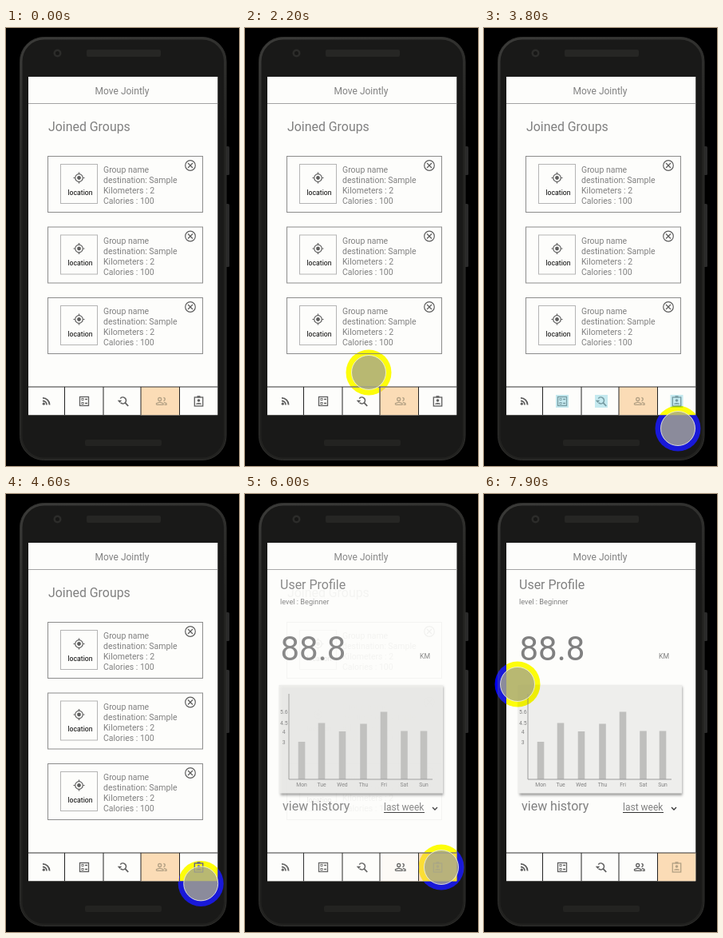
An HTML page with a canvas for the animation above (8 s loop, 292 px wide and 548 px high).

```html
<!DOCTYPE html>
<html lang="en">
<head>
<meta charset="utf-8">
<title>Running app prototype</title>
<style>
html, body { margin: 0; width: 100%; height: 100%; overflow: hidden; background: #000; }
canvas { display: block; width: 292px; height: 548px; }
</style>
</head>
<body>
<canvas id="stage"></canvas>
<script>
const W = 292, H = 548, LOOP = 8000, STEP = 100;
const canvas = document.getElementById('stage');
const ctx = canvas.getContext('2d');
const dpr = window.devicePixelRatio || 1;
canvas.width = W * dpr;
canvas.height = H * dpr;

const INK = '#808080', ICON = '#5e5e5e', PAPER = '#fdfdfb', TAB = '#fbdcb6';
const SCREEN = [28, 61, 237.5, 423.5];
const TAB_EDGES = [28, 73.5, 122, 169, 217.5, 265.5];
const TAB_ICONS = [rssIcon, listIcon, searchIcon, peopleIcon, badgeIcon];
const TAB_CENTERS = [50.5, 98, 147, 195, 241.5];
const TAB_Y = 467;

const MISSED_TAPS = [1300, 3300], TAB_TAP = 5400;

// pointer path: time, x, y
const PATH = [
  [600, 195, 467], [1000, 155, 431], [2400, 155, 431], [2800, 212, 458],
  [3100, 261, 488], [3300, 243, 498], [3400, 243, 501], [4400, 243, 501],
  [4900, 246, 467], [7100, 246, 467], [7200, 210, 481], [7700, 32, 254], [7900, 42, 238]
];

const clamp = v => Math.max(0, Math.min(1, v));
const span = (t, a, b) => clamp((t - a) / (b - a));
const ease = k => k * k * (3 - 2 * k);
const mix = (a, b, k) => a + (b - a) * k;

function text(str, x, y, size, color = INK, align = 'left') {
  ctx.font = `${size}px Roboto, Arial, sans-serif`;
  ctx.textAlign = align;
  ctx.fillStyle = color;
  ctx.fillText(str, x, y);
}

function box(x, y, w, h, color) {
  ctx.fillStyle = color;
  ctx.fillRect(x, y, w, h);
}

function frame(x, y, w, h, color, width = 1) {
  ctx.strokeStyle = color;
  ctx.lineWidth = width;
  ctx.strokeRect(x, y, w, h);
}

function round(x, y, w, h, r, fill, stroke) {
  ctx.beginPath();
  ctx.roundRect(x, y, w, h, r);
  ctx.fillStyle = fill;
  ctx.fill();
  if (!stroke) return;
  ctx.strokeStyle = stroke;
  ctx.lineWidth = 1;
  ctx.stroke();
}

function line(points, color, width = 1) {
  ctx.beginPath();
  points.forEach(([x, y]) => ctx.lineTo(x, y));
  ctx.strokeStyle = color;
  ctx.lineWidth = width;
  ctx.stroke();
}

function arc(x, y, r, color, width, from = 0, to = 2 * Math.PI) {
  ctx.beginPath();
  ctx.arc(x, y, r, from, to);
  ctx.strokeStyle = color;
  ctx.lineWidth = width;
  ctx.stroke();
}

function disc(x, y, r, color) {
  ctx.beginPath();
  ctx.arc(x, y, r, 0, 2 * Math.PI);
  ctx.fillStyle = color;
  ctx.fill();
}

function rssIcon(x, y, color) {
  disc(x - 3.2, y + 3.2, 1.6, color);
  for (const r of [5, 8.6]) arc(x - 4.5, y + 4.5, r, color, 1.8, -Math.PI / 2, 0);
}

function listIcon(x, y, color) {
  frame(x - 5.5, y - 5.5, 11, 11, color, 1.3);
  for (const dy of [-2.5, 2.5]) {
    frame(x - 3, y + dy - 1, 2, 2, color, 1);
    line([[x + 1, y + dy], [x + 4, y + dy]], color, 1.3);
  }
}

function searchIcon(x, y, color) {
  arc(x - 0.5, y - 1, 4, color, 1.5, -2.5, 2.4);
  line([[x + 2.3, y + 1.8], [x + 6.2, y + 6]], color, 1.8);
  ctx.beginPath();
  ctx.moveTo(x - 7.2, y - 1.2);
  ctx.lineTo(x - 1.8, y - 1.2);
  ctx.lineTo(x - 4.5, y + 2);
  ctx.fillStyle = color;
  ctx.fill();
}

function peopleIcon(x, y, color) {
  arc(x - 2.3, y - 2.5, 2, color, 1.3);
  arc(x + 2, y - 2.5, 2.2, color, 1.4, -1.4, 1.4);
  line([[x - 6.5, y + 4.3], [x - 6.5, y + 2.6], [x - 2.3, y + 1.2], [x + 2, y + 2.6],
    [x + 2, y + 4.3], [x - 6.5, y + 4.3]], color, 1.3);
  line([[x + 3, y + 1.3], [x + 6, y + 2.6], [x + 6, y + 4.3], [x + 3.5, y + 4.3]], color, 1.3);
}

function badgeIcon(x, y, color) {
  frame(x - 5.2, y - 5, 10.4, 11, color, 1.3);
  box(x - 2, y - 6.8, 4, 2.2, color);
  disc(x, y - 1, 1.8, color);
  ctx.beginPath();
  ctx.ellipse(x, y + 3.7, 3.5, 1.7, 0, Math.PI, 0);
  ctx.fill();
}

function targetIcon(x, y) {
  arc(x, y, 4.8, ICON, 1.2);
  disc(x, y, 2.4, ICON);
  for (const s of [-1, 1]) {
    line([[x + s * 5, y], [x + s * 7, y]], ICON, 1.2);
    line([[x, y + s * 5], [x, y + s * 7]], ICON, 1.2);
  }
}

function closeIcon(x, y) {
  arc(x, y, 6.3, ICON, 1.2);
  line([[x - 3, y - 3], [x + 3, y + 3]], ICON, 1.2);
  line([[x - 3, y + 3], [x + 3, y - 3]], ICON, 1.2);
}

function phone() {
  box(0, 0, W, H, '#000');
  round(275, 148, 5, 36, 1.5, '#2a2a2a');
  round(275, 220, 5, 79, 1.5, '#2a2a2a');
  const rim = ctx.createLinearGradient(17, 11, 80, 200);
  rim.addColorStop(0, '#3c3c3a');
  rim.addColorStop(1, '#222220');
  round(17.5, 11.5, 258.5, 529, 30, rim, '#2e2e2c');
  round(20.5, 14.5, 252.5, 523, 27, '#191918');
  disc(64.5, 31.5, 5, '#2c2c2a');
  disc(64.5, 31.5, 2.5, '#171716');
  round(101, 27, 93, 9, 2, '#262624');
  round(99, 515, 96, 8, 2, '#232321');
}

function base() {
  box(...SCREEN, PAPER);
  line([[28, 94.5], [265.5, 94.5]], '#a3a3a3');
  text('Move Jointly', 145.5, 82.5, 12, INK, 'center');
}

function navBar(active) {
  const left = TAB_EDGES[active];
  box(left, 449, TAB_EDGES[active + 1] - left, 35.5, TAB);
  line([[28, 449], [265.5, 449]], '#333');
  TAB_EDGES.slice(1, 5).forEach(x => line([[x, 449], [x, 484.5]], '#222'));
  TAB_ICONS.forEach((icon, i) =>
    icon(TAB_CENTERS[i], TAB_Y, i === active ? '#b3a184' : ICON));
}

function groupCard(y) {
  frame(52.5, y + 0.5, 194, 70, '#8c8c8c');
  frame(68.5, y + 10.5, 46, 49, '#b4b4b4');
  targetIcon(91.5, y + 27.5);
  text('location', 93, y + 48.5, 8.7, '#000', 'center');
  const rows = ['Group name', 'destination: Sample', 'Kilometers : 2', 'Calories : 100'];
  rows.forEach((row, i) => text(row, 122, y + 21 + i * 13.1, 10.5));
  closeIcon(231, y + 12);
}

function groupsScreen() {
  base();
  text('Joined Groups', 53, 129, 15.9);
  [160, 248.5, 337].forEach(groupCard);
  navBar(3);
}

function chart() {
  ctx.save();
  ctx.shadowColor = 'rgba(0,0,0,.4)';
  ctx.shadowBlur = 3 * dpr;
  ctx.shadowOffsetX = dpr;
  ctx.shadowOffsetY = 2 * dpr;
  box(42.5, 239, 205.5, 135.5, '#eeeeec');
  ctx.restore();
  const bars = [['Mon', 71, 310], ['Tue', 96, 286.5], ['Wed', 122, 297], ['Thu', 148.5, 287.5],
    ['Fri', 174, 272.5], ['Sat', 199.5, 296.5], ['Sun', 224, 296.5]];
  for (const [day, x, top] of bars) {
    box(x - 4.3, top, 8.6, 357 - top, '#bfbfbd');
    text(day, x, 365.5, 6.8, INK, 'center');
  }
  line([[55, 250], [55, 357], [235, 357]], '#9a9a9a');
  [['5.6', 275], ['4.5', 289], ['4', 299.5], ['3', 312.5]]
    .forEach(([label, y]) => text(label, label.length > 1 ? 53.5 : 50.5, y, 6.8, INK, 'right'));
}

function profileScreen() {
  base();
  text('User Profile', 44, 118.5, 16);
  text('level : Beginner', 44, 137.5, 9.2);
  text('88.8', 44.5, 207.5, 42);
  text('KM', 219, 206, 8.7);
  chart();
  text('view history', 47, 396, 16);
  text('last week', 174, 396, 12);
  line([[174, 398.5], [225, 398.5]], '#333');
  line([[235, 392], [238, 395], [241, 392]], '#333', 1.3);
  navBar(4);
}

// tappable areas blink after a tap on empty space
function hotspots(t) {
  const blink = tap =>
    ease(span(t, tap, tap + 200)) * (1 - ease(span(t, tap + 500, tap + 900)));
  const alpha = 0.5 * Math.max(...MISSED_TAPS.map(blink));
  if (!alpha) return;
  ctx.globalAlpha = alpha;
  [1, 2, 4].forEach(i => box(TAB_CENTERS[i] - 8, TAB_Y - 8, 16, 16, '#8cd6e4'));
  ctx.globalAlpha = 1;
}

function pointerAt(t) {
  const i = PATH.findIndex(p => p[0] > t);
  if (i < 0) return PATH[PATH.length - 1].slice(1);
  const [t0, x0, y0] = PATH[i - 1], [t1, x1, y1] = PATH[i];
  const k = span(t, t0, t1);
  return [mix(x0, x1, k), mix(y0, y1, k)];
}

// the halo inverts blue: yellow over the screen, blue over the dark body
function pointer(t) {
  if (t < PATH[0][0]) return;
  const [x, y] = pointerAt(t);
  ctx.globalAlpha = span(t, 500, 800);
  ctx.globalCompositeOperation = 'difference';
  disc(x, y, 28.5, '#0000f0');
  ctx.globalCompositeOperation = 'source-over';
  disc(x, y, 21.5, 'rgba(168,168,140,.8)');
  arc(x, y, 21.5, 'rgba(240,240,225,.85)', 1);
  ctx.globalAlpha = 1;
  const tapped = [...MISSED_TAPS, TAB_TAP].some(tap => t >= tap && t < tap + 200);
  if (tapped) arc(x + 0.5, y, 6, '#dc2626', 3);
}

function draw(t) {
  ctx.setTransform(dpr, 0, 0, dpr, 0, 0);
  phone();
  const dissolve = ease(span(t, TAB_TAP + 100, TAB_TAP + 700));
  ctx.save();
  ctx.beginPath();
  ctx.rect(...SCREEN);
  ctx.clip();
  if (dissolve < 1) groupsScreen();
  hotspots(t);
  if (dissolve > 0) {
    ctx.globalAlpha = dissolve;
    profileScreen();
  }
  ctx.restore();
  pointer(t);
}

function tick(now) {
  draw(Math.floor((now % LOOP) / STEP) * STEP);
  requestAnimationFrame(tick);
}
tick(performance.now());
</script>
</body>
</html>
```
